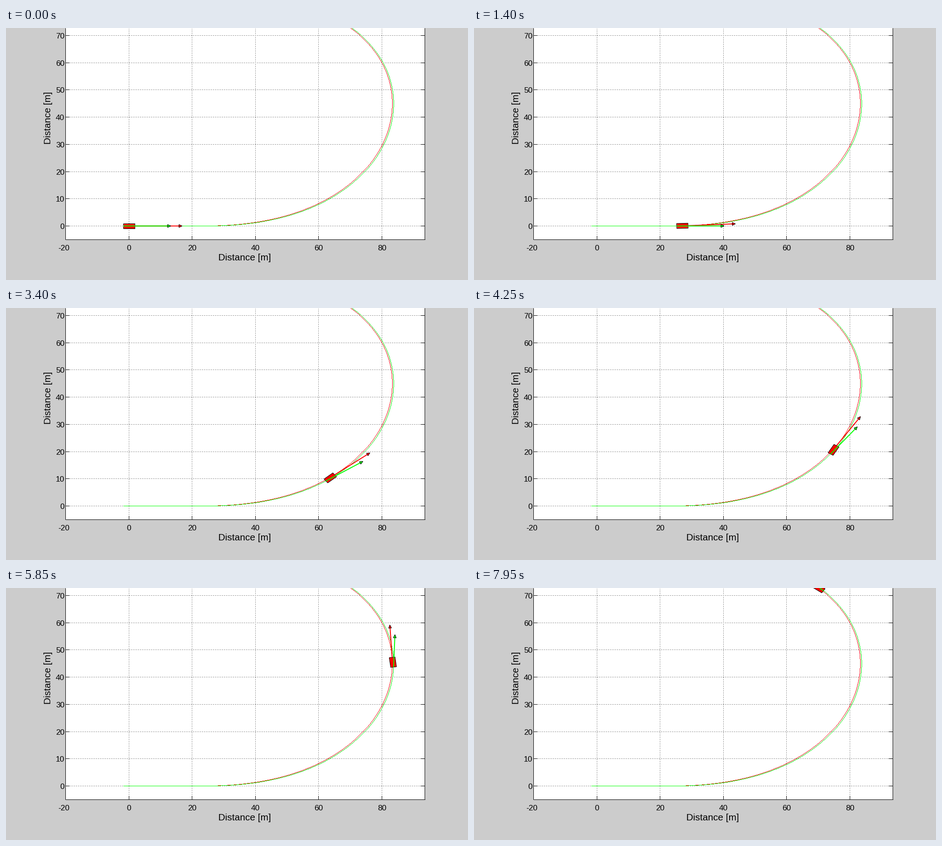
A matplotlib script that plays this animation: 1012x553 px, repeating every 8000 ms.

```python
import numpy as np
import matplotlib.pyplot as plt
from matplotlib.animation import FuncAnimation
from matplotlib.collections import PolyCollection
from matplotlib.patches import Polygon, Rectangle

W, H, DPI = 1012, 553, 64
PX = 72 / DPI                      # one pixel in points
FRAMES, INTERVAL = 160, 50
CAR_LEN, CAR_WID = 3.6, 1.85       # metres
STEP = 0.02                        # path sampling in metres
SCALE = np.array([6.925, -5.972])  # pixels per metre
ORIGIN = np.array([269, 434])
RED, GREEN = "#ff0000", "#00ff00"


def to_px(p):
    return ORIGIN + 0.5 + np.asarray(p) * SCALE


def unit(v):
    return v / np.hypot(*v)


def arc_length(p):
    return np.r_[0, np.cumsum(np.hypot(*np.diff(p, axis=0).T))]


def resample(p):
    s = arc_length(p)
    u = np.arange(0, s[-1], STEP)
    return np.column_stack([np.interp(u, s, p[:, k]) for k in (0, 1)])


# The front runs straight, then along a smooth bend through a few key points
KEYS = (np.array([
    (435, 434), (500, 431.3), (580, 419.7), (650, 400.3), (720, 364.3), (768, 329),
    (810, 279), (834, 232), (846, 160), (835.5, 105), (806, 49), (774, 15.5),
    (700, -30)]) - ORIGIN) / SCALE
chord = arc_length(KEYS)
t = np.linspace(0, chord[-1], 4000)
bend = np.column_stack([np.polynomial.Polynomial.fit(chord, KEYS[:, k], 6)(t)
                        for k in (0, 1)])
front_path = resample(np.vstack([(CAR_LEN / 2, 0), bend]))

# The rear drifts to the outside of the bend
heading = np.gradient(bend, axis=0)
heading /= np.hypot(*heading.T)[:, None]
drift = 0.43 * np.sin(np.pi * t / 145)
outside = np.column_stack([heading[:, 1], -heading[:, 0]])
rear_path = resample(np.vstack([(-CAR_LEN / 2, 0), bend + drift[:, None] * outside]))

# Constant speed at first, then losing pace through the bend
speed = 15 - 0.0368 * np.maximum(np.arange(FRAMES) - 34, 0)
travel = np.cumsum(speed / 15)
travel = np.maximum(travel - travel[1], 0)

fig = plt.figure(figsize=(W / DPI, H / DPI), dpi=DPI, facecolor="#cccccc")
ax = fig.add_axes([0, 0, 1, 1])
ax.set_xlim(0, W)
ax.set_ylim(H, 0)
ax.axis("off")

LEFT, RIGHT, BOTTOM, TICK = 130, 917, 464, 8
ax.add_patch(Rectangle((LEFT, 0), RIGHT - LEFT, BOTTOM, fc="white", ec="none", zorder=0))


def rule(x, y, **kw):
    ax.plot(x, y, color="black", lw=PX, solid_capstyle="butt", dash_capstyle="butt",
            zorder=1, **kw)


def label(x, y, text, size, **kw):
    ax.text(x, y, text, fontsize=size * PX, family="Liberation Sans", va="baseline", **kw)


DOTS = (0.5, (1, 3))
for v in range(0, 81, 20):
    x = round(ORIGIN[0] + v * SCALE[0] - 0.01)
    rule([x, x], [0, BOTTOM], ls=DOTS)
    rule([x, x], [BOTTOM - TICK, BOTTOM])
    label(x + 0.5, 488, str(v), 17.2, ha="center")
label(127, 488, "-20", 17.2, ha="center")
for v in range(0, 71, 10):
    y = round(ORIGIN[1] + v * SCALE[1])
    rule([LEFT, RIGHT], [y, y], ls=DOTS)
    rule([LEFT, LEFT + TICK + 1], [y, y])
    rule([RIGHT - TICK - 1, RIGHT], [y, y])
    label(128, y + 7, str(v), 17.2, ha="right")
for x in (LEFT, RIGHT):
    rule([x, x], [0, BOTTOM])
rule([LEFT, RIGHT + 1], [BOTTOM, BOTTOM])
label(522.5, 510, "Distance [m]", 20.7, ha="center")
label(98, 197, "Distance [m]", 20.7, ha="center", rotation=90, rotation_mode="anchor")


def draw_trail(path, color, z):
    """One-pixel line without smoothing: a chain of unit squares."""
    chain = []
    for p in np.floor(to_px(path)):
        if chain and (p == chain[-1]).all():
            continue
        if len(chain) > 1 and abs(p - chain[-2]).max() == 1:
            chain[-1] = p          # cut the corner of a step
        else:
            chain.append(p)
    square = np.array([(0, 0), (1, 0), (1, 1), (0, 1)])
    cells = np.array(chain)[:, None] + square
    ax.add_collection(PolyCollection(cells, facecolors=color, edgecolors="none",
                                     linewidths=0, antialiaseds=False, zorder=z),
                      autolim=False)


draw_trail(front_path, RED, 2)
draw_trail(rear_path, GREEN, 3)
car = ax.add_patch(Polygon(np.zeros((4, 2)), fc=RED, ec="black", lw=PX,
                           joinstyle="miter", zorder=4))


class Arrow:
    def __init__(self, color, z):
        self.shaft, = ax.plot([], [], color=color, lw=2 * PX,
                              solid_capstyle="butt", zorder=z)
        self.head = ax.add_patch(Polygon(np.zeros((3, 2)), fc=color, ec="black",
                                         lw=PX, zorder=z + 0.1))

    def place(self, start, vector):
        a, tip = to_px(start), to_px(start + vector)
        d = unit(tip - a)
        side = 3.2 * np.array([-d[1], d[0]])
        base = tip - 7 * d
        self.shaft.set_data(*np.array([a, base]).T)
        self.head.set_xy([tip, base + side, base - side])


front_arrow, rear_arrow = Arrow(RED, 5), Arrow(GREEN, 6)


def tangent(path, i):
    return unit(path[i + 40] - path[max(i - 40, 0)])


def draw(n):
    i = int(round(travel[n] / STEP))
    front = front_path[i]
    # The rear follows its own path one car length behind
    lo = max(i - int(2.5 / STEP), 0)
    near = rear_path[lo:i + int(2 / STEP)]
    j = lo + np.argmin(abs(np.hypot(*(near - front).T) - CAR_LEN))
    rear = rear_path[j]

    axis = unit(front - rear)
    side = np.array([-axis[1], axis[0]]) * CAR_WID / 2
    car.set_xy(to_px([rear - side, front - side, front + side, rear + side]))
    front_arrow.place(front, speed[n] * tangent(front_path, i))
    rear_arrow.place(rear, speed[n] * tangent(rear_path, j))
    return []


anim = FuncAnimation(fig, draw, frames=FRAMES, interval=INTERVAL, repeat=True,
                     repeat_delay=0, init_func=lambda: draw(0), blit=False)
plt.show()
```
